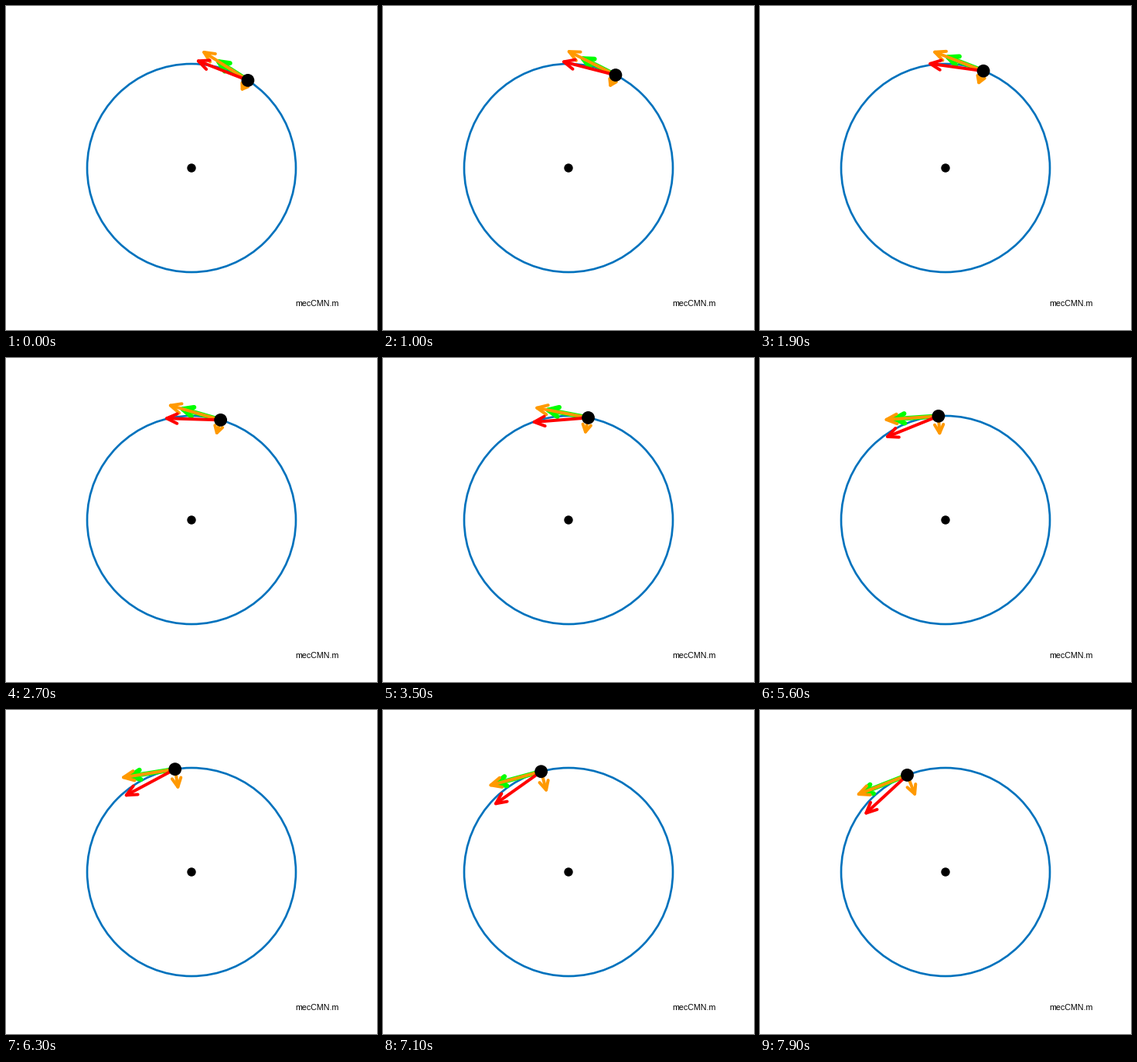
A matplotlib script that plays this animation: 480 by 420 pixels, repeating every 8000 ms.

```python
import numpy as np
import matplotlib.pyplot as plt
from matplotlib.animation import FuncAnimation
from matplotlib.patches import Circle

W, H, DPI = 480, 420, 96
FRAMES, INTERVAL = 80, 100
CENTER = np.array([W / 2, H / 2])
R = 135
ORANGE = (1, 0.6, 0)


def px(n):
    """Pixels to points."""
    return n * 72 / DPI


fig = plt.figure(figsize=(W / DPI, H / DPI), dpi=DPI, facecolor="white")
ax = fig.add_axes([0, 0, 1, 1])
ax.set_xlim(0, W)
ax.set_ylim(H, 0)
ax.axis("off")

ax.add_patch(Circle(CENTER, R, fill=False, ec="#0072BD", lw=px(2.67), zorder=1))
ax.add_patch(Circle(CENTER, 5.7, fc="black", lw=0, zorder=2))
ball = ax.add_patch(Circle(CENTER, 8.4, fc="black", lw=0, zorder=9))
ax.text(374.4, 389, "mecCMN.m", family="Liberation Sans", size=8,
        color="black", ha="left", va="baseline")


class Arrow:
    """Shaft with an open two-barb head."""

    def __init__(self, color, width, z, max_head=13.5):
        style = dict(color=color, lw=px(width), zorder=z,
                     solid_capstyle="round", solid_joinstyle="round")
        self.shaft, = ax.plot([], [], **style)
        self.head, = ax.plot([], [], **style)
        self.max_head = max_head

    def set(self, start, vec):
        length = np.hypot(*vec)
        u = vec / length
        side = np.array([-u[1], u[0]])
        tip = start + vec
        back = min(length / 2, self.max_head)
        half = 3 + 0.24 * back
        base = tip - back * u
        self.shaft.set_data(*np.transpose([start, tip]))
        self.head.set_data(*np.transpose([base + half * side, tip,
                                          base - half * side]))


velocity = Arrow((0, 1, 0), 6, 3)
tangential = Arrow(ORANGE, 4, 4)
normal = Arrow(ORANGE, 4, 5, max_head=11.5)
total = Arrow((1, 0, 0), 4, 6)


def update(i):
    # uniform angular acceleration, started from rest at t = 0
    t = 10 + 0.05 * i
    theta = 0.01 * t ** 2
    c, s = np.cos(theta), np.sin(theta)
    pos = CENTER + R * np.array([c, -s])
    along, inward = np.array([-s, -c]), np.array([-c, s])
    a_t = 0.5 * R * along
    a_n = 0.1 * R * theta * inward

    ball.center = pos
    velocity.set(pos, R * t / 30 * along)
    tangential.set(pos, a_t)
    normal.set(pos, a_n)
    total.set(pos, a_t + a_n)


anim = FuncAnimation(fig, update, frames=FRAMES, init_func=lambda: update(0),
                     interval=INTERVAL, repeat=True, repeat_delay=0)
plt.show()
```
